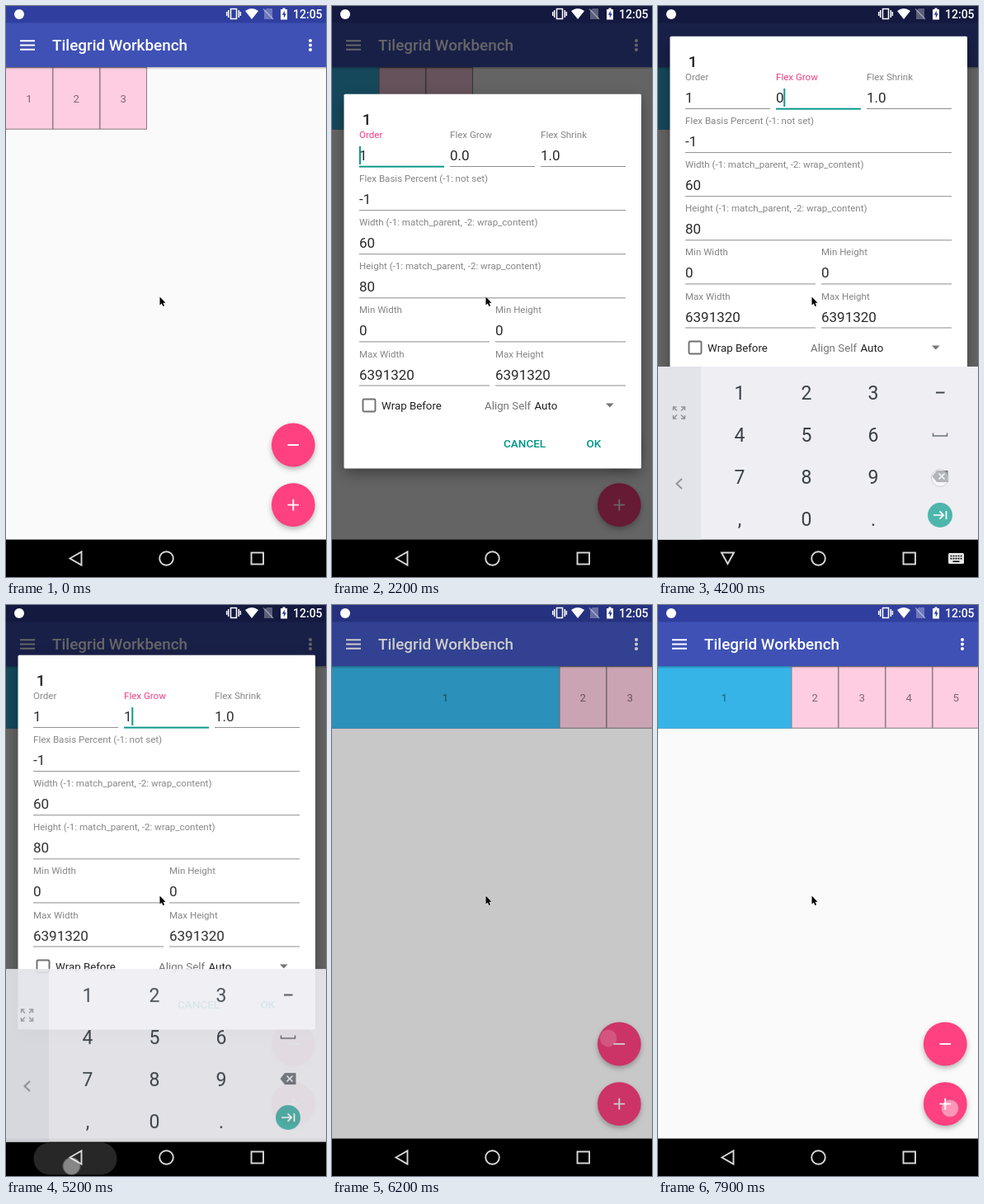
An HTML page for the animation above (8000 ms loop, 388 px wide and 692 px high).

```html
<!DOCTYPE html>
<html lang="en">
<head>
<meta charset="utf-8">
<title>Flexible row demo</title>
<style>
html, body { margin: 0; width: 100%; height: 100%; overflow: hidden; background: #fafafa; }
svg { display: block; width: 388px; height: 692px; font-family: Roboto, sans-serif; }
.med { font-weight: 500; }
.label { font-size: 11.55px; fill: #858585; }
.value { font-size: 17px; fill: #2b2b2b; }
.small { font-size: 13.3px; fill: #212121; }
.button { font-size: 13.5px; font-weight: 500; fill: #009688; }
.num { font-size: 13.2px; fill: #000; fill-opacity: .5; text-anchor: middle; }
.key { font-size: 23px; fill: #3a4147; text-anchor: middle; }
.line { fill: none; stroke: #d9d9d9; stroke-width: 1.9; }
.tile { fill: #fecde1; stroke: #8c8488; stroke-width: 1.1; }
.fab circle { fill: #ff4081; filter: drop-shadow(0 3px 3px rgba(0,0,0,.28)); }
.fab path { stroke: #fff; stroke-width: 1.9; }
.sheet { fill: #fff; filter: drop-shadow(0 6px 8px rgba(0,0,0,.35)); }

/* hard changes */
#first, #firstNum, #blue, #rest, .later, #orderLabel, #growLabel, .onOrder, .onGrow,
#orderCaret, #growCaret, #handle, .txt, #back, #down { animation: 8s step-end infinite; }
/* eased changes */
#scrim, #dialog, #pill { animation: 8s linear infinite; }
#form, #keys { animation: 8s ease-out infinite; }

#first, #blue { width: 57px; animation-name: grow; }
#blue { animation: grow 8s step-end infinite, pick 8s step-end infinite; }
#firstNum { animation-name: centre; }
#rest { animation-name: push; }
.later { animation-name: later; }
#scrim { animation-name: scrim; }
#dialog { animation-name: fade; }
#form { animation-name: lift; }
#keys { animation-name: keys; }
#orderLabel { animation-name: lose; }
#growLabel { animation-name: gain; }
.onOrder { animation-name: before; }
.onGrow { animation-name: after; }
#orderCaret { animation-name: blink; }
#growCaret { animation-name: caret; }
#handle { animation-name: handle; }
#t0 { animation-name: t0; } #t1 { animation-name: t1; }
#t2 { animation-name: t2; } #t3 { animation-name: t3; }
#back { animation-name: back; }
#down { animation-name: down; }
#pill { animation-name: pill; }
#dot { animation: spot 8s step-end infinite, tap 8s linear infinite; }

@keyframes grow { 0% { width: 57px } 72.5% { width: 276px } 86.25% { width: 219px } 93.75%, 100% { width: 162px } }
@keyframes centre { 0% { transform: translateX(28px) } 72.5% { transform: translateX(137.5px) } 86.25% { transform: translateX(109px) } 93.75%, 100% { transform: translateX(80.5px) } }
@keyframes push { 0% { transform: none } 72.5% { transform: translateX(219px) } 86.25% { transform: translateX(162px) } 93.75%, 100% { transform: translateX(105px) } }
@keyframes later { 0% { opacity: 0 } 72.5%, 100% { opacity: 1 } }
@keyframes pick { 0% { opacity: 0 } 12.5%, 100% { opacity: 1 } }
@keyframes scrim { 0%, 13.75%, 80%, 100% { opacity: 0 } 21.25%, 72.5% { opacity: .6 } }
@keyframes fade { 0%, 13.75%, 75.6%, 100% { opacity: 0 } 16.25% { opacity: .86 } 17.5%, 72.5% { opacity: 1 } }
@keyframes lift {
  0%, 35.6%, 67.5%, 100% { transform: none }
  39.4%, 63.75% { transform: translateY(-70px); animation-timing-function: linear }
  65% { transform: translateY(-46.5px) }
}
@keyframes keys {
  0%, 36.2%, 67.5%, 100% { opacity: 0; transform: translateY(14px) }
  39.4%, 63.75% { opacity: 1; transform: none; animation-timing-function: linear }
  65% { opacity: .92; transform: translateY(4px) }
}
@keyframes lose { 0% { fill: #f03c86 } 35%, 100% { fill: #858585 } }
@keyframes gain { 0% { fill: #858585 } 35%, 100% { fill: #f03c86 } }
@keyframes before { 0% { opacity: 1 } 35%, 100% { opacity: 0 } }
@keyframes after { 0% { opacity: 0 } 35%, 100% { opacity: 1 } }
@keyframes blink { 0% { opacity: 1 } 20% { opacity: 0 } 25% { opacity: 1 } 35%, 100% { opacity: 0 } }
@keyframes caret {
  0% { opacity: 0; transform: translateX(166px) }
  35% { opacity: 1; transform: translateX(166px) }
  47.5% { opacity: 1; transform: translateX(156.5px) }
  50% { opacity: 1; transform: translateX(152.3px) }
  53.1% { opacity: 1; transform: translateX(143px) }
  56.25%, 100% { opacity: 1; transform: translateX(152.3px) }
}
@keyframes handle { 0% { opacity: 0 } 36.2% { opacity: 1 } 47.5%, 100% { opacity: 0 } }
@keyframes t0 { 0% { opacity: 1 } 47.5%, 100% { opacity: 0 } }
@keyframes t1 { 0% { opacity: 0 } 47.5% { opacity: 1 } 50%, 100% { opacity: 0 } }
@keyframes t2 { 0% { opacity: 0 } 50% { opacity: 1 } 53.1%, 100% { opacity: 0 } }
@keyframes t3 { 0% { opacity: 0 } 56.25%, 100% { opacity: 1 } }
@keyframes back { 0% { opacity: 1 } 36.8% { opacity: 0 } 63.75%, 100% { opacity: 1 } }
@keyframes down { 0% { opacity: 0 } 36.8% { opacity: 1 } 63.75%, 100% { opacity: 0 } }
@keyframes pill { 0%, 62.5%, 68%, 100% { opacity: 0 } 63.75%, 65.6% { opacity: 1 } }
@keyframes spot {
  0% { transform: translate(28px, 112px) }
  30% { transform: translate(165px, 181px) }
  40% { transform: translate(342px, 572px) }
  54.5% { transform: translate(98px, 471px) }
  60% { transform: translate(79.5px, 680px) }
  68% { transform: translate(335px, 525px) }
  81%, 100% { transform: translate(354px, 610px) }
}
@keyframes tap {
  0%, 11.2%, 14.4%, 33.7%, 36.9%, 46.2%, 48.1%, 48.7%, 50.6%, 51.8%, 53.75%, 54.9%, 57.5%,
  62.4%, 67%, 68.7%, 80%, 82.4%, 85.6%, 89.9%, 93.75%, 97.4% { opacity: 0 }
  11.25%, 13%, 33.75%, 35.5%, 46.25%, 47.5%, 48.75%, 50%, 51.9%, 53.1%, 55%, 56.25%,
  62.5%, 65.6%, 68.75%, 72%, 82.5%, 84.4%, 90%, 92.5%, 97.5%, 100% { opacity: .45 }
  77.5% { opacity: .17 }
}
</style>
</head>
<body>
<svg viewBox="0 0 388 692">
  <defs>
    <linearGradient id="shade" x2="0" y2="1"><stop stop-opacity=".28"/><stop offset="1" stop-opacity="0"/></linearGradient>
  </defs>
  <rect width="388" height="692" fill="#fafafa"/>

  <!-- row of tiles -->
  <rect id="first" class="tile" x="-.5" y="74.5" height="74.7"/>
  <rect id="blue" y="74" height="75.6" fill="#36b4e8"/>
  <text id="firstNum" class="num" y="117">1</text>
  <g id="rest"></g>

  <!-- app bar -->
  <rect y="74" width="388" height="3" fill="url(#shade)"/>
  <rect width="388" height="74" fill="#3f51b5"/>
  <rect width="388" height="20.5" fill="#303f9f"/>
  <path d="M17 42.2h18M17 47.5h18M17 52.8h18" stroke="#fff" stroke-width="1.9"/>
  <text class="med" x="56" y="54.3" font-size="18.9" fill="#fff">Tilegrid Workbench</text>
  <g fill="#fff"><circle cx="369" cy="42" r="2"/><circle cx="369" cy="47.5" r="2"/><circle cx="369" cy="53" r="2"/></g>

  <g class="fab"><circle cx="348.3" cy="532" r="26.4"/><path d="M341.5 532h13.6"/></g>
  <g class="fab"><circle cx="348.3" cy="604.6" r="26.4"/><path d="M341.5 604.6h13.6M348.3 597.8v13.6"/></g>

  <rect id="scrim" width="388" height="647"/>

  <g id="dialog"><g id="form">
    <rect class="sheet" x="14.5" y="106.8" width="360.5" height="453.7" rx="1.5"/>
    <text class="med" x="36.8" y="143.7" font-size="19" fill="#212121">1</text>
    <g id="fields"></g>
    <rect class="onOrder" x="33" y="193.7" width="103" height="1.9" fill="#009688"/>
    <rect class="onGrow" x="143" y="193.7" width="103" height="1.9" fill="#009688"/>
    <g class="value">
      <text id="t0" class="txt" x="143" y="187">0.0</text>
      <text id="t1" class="txt" x="143" y="187">0.</text>
      <text id="t2" class="txt" x="143" y="187">0</text>
      <text id="t3" class="txt" x="143" y="187">1</text>
    </g>
    <rect id="orderCaret" x="33" y="170" width="1.9" height="22" fill="#009688"/>
    <rect id="growCaret" y="170" width="1.9" height="22" fill="#009688"/>
    <path id="handle" d="M166.5 192.5l7 5.5a9.7 9.7 0 1 1-14 0z" fill="#009688"/>
    <rect x="37.5" y="476.5" width="15" height="15" rx="1.5" fill="none" stroke="#707070" stroke-width="1.9"/>
    <text class="small" x="60" y="488.8">Wrap Before</text>
    <text class="small" x="185" y="488.8" style="fill:#757575">Align Self</text>
    <text class="small" x="245.5" y="488.8">Auto</text>
    <path d="M332 481.5h9.6l-4.8 5z" fill="#757575"/>
    <text class="button" x="208" y="535.2">CANCEL</text>
    <text class="button" x="308.5" y="535.2">OK</text>
  </g></g>

  <!-- status icons -->
  <g fill="#fff">
    <circle cx="16" cy="10" r="6"/>
    <path d="M272.5 3.5h7v12h-7zM269.7 5v9M282.3 5v9M267.7 7v5M284.3 7v5" fill="none" stroke="#fff" stroke-width="1.5"/>
    <path d="M290 6Q298 0 306 6L298 16z"/>
    <path d="M316 3h7v13h-10V6z" opacity=".3"/>
    <path d="M312 3.5L324 16" stroke="#fff" stroke-opacity=".45" stroke-width="1.3"/>
    <path d="M333 4h2.5V2.5h3V4h2.5v12.5h-8z"/>
    <path d="M337.8 5.5l-3 5.2h2v4l3-5.4h-2z" fill="#303f9f"/>
    <text x="348" y="14.7" font-size="14" class="med">12:05</text>
  </g>

  <!-- navigation bar -->
  <rect y="646.6" width="388" height="46"/>
  <rect id="pill" x="33.5" y="651.5" width="101" height="39" rx="19.5" fill="#272727"/>
  <path id="back" class="line" d="M77.5 669.5L91.5 661.5V677.5z"/>
  <g id="down">
    <path class="line" d="M77 662.5H92L84.5 676z"/>
    <rect x="352" y="663" width="19" height="13" rx="1.5" fill="#e6e6e6"/>
    <path d="M354.5 666.5h14M354.5 669.7h14" stroke="#000" stroke-width="1.7" stroke-dasharray="1.8 1.25"/>
    <path d="M357.5 673.2h8" stroke="#000" stroke-width="1.5"/>
  </g>
  <circle class="line" cx="194.5" cy="669.5" r="8.3"/>
  <rect class="line" x="297.5" y="662.5" width="14.5" height="14"/>

  <g id="keys">
    <rect y="437" width="388" height="209.6" fill="#eeeef3"/>
    <rect y="437" width="52" height="209.6" fill="#e3e4e9"/>
    <g fill="none" stroke="#8f949b" stroke-width="1.5">
      <path d="M18.5 490v-4h4M18.5 486l4.5 4.5M28 486h4.5v4M32.5 486l-4.5 4.5M18.5 496v4h4M18.5 500l4.5-4.5M28 500h4.5v-4M32.5 500l-4.5-4.5"/>
      <path d="M29 573l-6.5 6 6.5 6" stroke-width="2"/>
      <path d="M333.5 517.5v3.5h17v-3.5" stroke="#6c7178"/>
    </g>
    <path d="M337 468.5h10.5" stroke="#3a4147" stroke-width="1.9"/>
    <path d="M332.5 570l5.5-7h13.5v14H338z" fill="#737980"/>
    <path d="M340.5 566.5l7 7M347.5 566.5l-7 7" stroke="#eeeef3" stroke-width="1.7"/>
    <circle cx="342" cy="617" r="15" fill="#4db6ac"/>
    <path d="M334 617h12M341.5 612.3l4.7 4.7-4.7 4.7M349.5 612v10" fill="none" stroke="#fff" stroke-width="1.7"/>
  </g>

  <circle id="dot" r="10.5" fill="#fff" stroke="#999" stroke-width=".8"/>
  <path d="M186.5 352.5v10l2.3-2 1.6 3.5 1.7-.8-1.6-3.4h3z" stroke="#fff" stroke-width="1" paint-order="stroke"/>
</svg>
<script>
const add = (id, html) => document.getElementById(id).insertAdjacentHTML('beforeend', html);
const text = (cls, x, y, s, id = '') => `<text class="${cls}" x="${x}" y="${y}"${id && ` id="${id}"`}>${s}</text>`;

// tiles 2 to 5
for (let n = 2; n < 6; n++) {
  const x = 57 * (n - 1);
  add('rest', `<g class="${n > 3 ? 'later' : ''}"><rect class="tile" x="${x}" y="74.5" width="56.5" height="74.7"/>${text('num', x + 28.3, 117, n)}</g>`);
}

// form fields: row, left, width, label, value, label id
const field = (row, x, w, label, value, id) => {
  const y = 160 + row * 53.1;
  add('fields', text('label', x, y, label, id) + text('value', x, y + 27, value) +
    `<rect x="${x}" y="${y + 34}" width="${w}" height="1" fill="#8d8d8d"/>`);
};
field(0, 33, 103, 'Order', '1', 'orderLabel');
field(0, 143, 103, 'Flex Grow', '', 'growLabel');
field(0, 253, 103, 'Flex Shrink', '1.0');
field(1, 33, 323, 'Flex Basis Percent (-1: not set)', '-1');
field(2, 33, 323, 'Width (-1: match_parent, -2: wrap_content)', '60');
field(3, 33, 323, 'Height (-1: match_parent, -2: wrap_content)', '80');
field(4, 33, 158, 'Min Width', '0');
field(4, 198, 158, 'Min Height', '0');
field(5, 33, 158, 'Max Width', '6391320');
field(5, 198, 158, 'Max Height', '6391320');

// number pad
[...'123456789,0.'].forEach((c, i) =>
  add('keys', text('key', 99 + i % 3 * 81, 477 + Math.floor(i / 3) * 51, c)));
</script>
</body>
</html>
```
